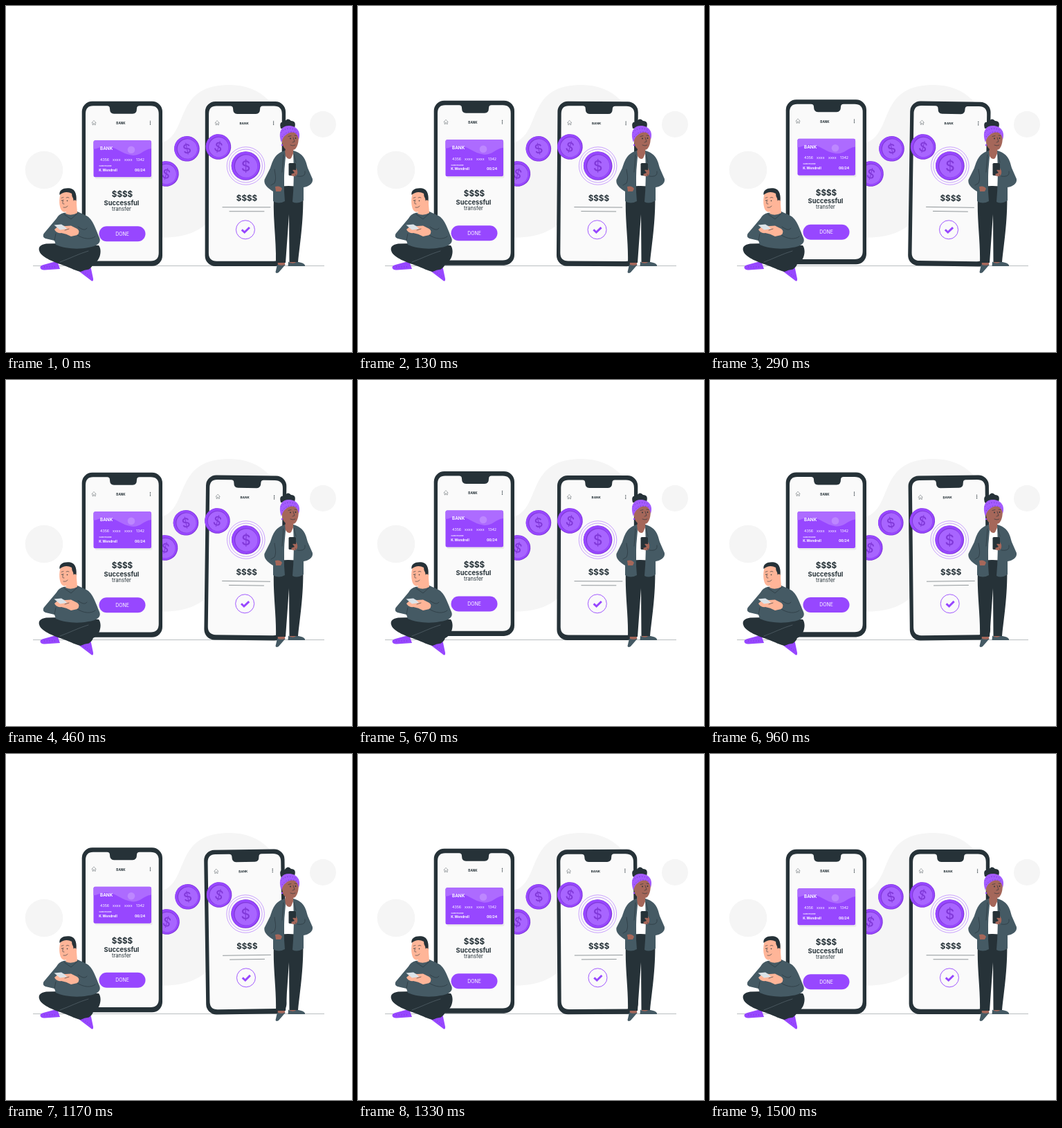
Recreate the animation shown at these times as an HTML page. Size 500 by 500 pixels, loop 1.54 s.

```html
<!DOCTYPE html>
<html lang="en">
<head>
<meta charset="utf-8">
<title>Bank transfer</title>
<style>
  html, body { margin: 0; width: 100%; height: 100%; overflow: hidden; background: #fff; }
  svg { display: block; width: 100%; height: 100%; }
  text { font-family: Inter, "Open Sans", sans-serif; font-weight: 700; }
  .mid { text-anchor: middle; }
  .dark { fill: #263238; }
  .slate { fill: #455a64; }
  .purple { fill: #9747ff; }
  .skin { fill: #ffb598; }
  .brown { fill: #a5675a; }
  .pale { fill: #f5f5f5; }
  .line { fill: none; stroke: #263238; stroke-width: .6; stroke-linecap: round; stroke-linejoin: round; }
  .ring { fill: none; stroke: #9747ff; stroke-width: .5; }
  .regular text, text.regular { font-weight: 400; }
</style>
</head>
<body>
<svg viewBox="0 0 500 500">
  <defs>
    <g id="phone">
      <rect class="dark" x="109.700" y="138" width="116.300" height="238" rx="15"/>
      <path fill="#fafafa" d="M126 144.500H146Q150 144.500 150 148.500Q150 156 156 156H183Q189 156 189 148.500Q189 144.500 193 144.500H209Q220.700 144.500 220.700 156V357Q220.700 368.700 209 368.700H126.500Q115 368.700 115 357V156Q115 144.500 126 144.500Z"/>
      <path class="line" d="M124 169L127 165.500L130 169M125 168.500V172H126.200V170H128V172H129.300V168.500" style="stroke-width:.35"/>
      <text class="dark mid" x="166" y="171.300" font-size="4.600">BANK</text>
      <g class="dark"><circle cx="208.500" cy="166.800" r=".7"/><circle cx="208.500" cy="169" r=".7"/><circle cx="208.500" cy="171.200" r=".7"/></g>
    </g>
    <g id="coin">
      <circle r="18.300" fill="#8139d9"/>
      <circle class="purple" cx="-.5" cy="-.3" r="17.700"/>
      <circle r="14.800" fill="#8139d9"/>
      <circle cx=".5" cy=".4" r="14.200" fill="#a865ff"/>
      <text class="mid" y="6.700" font-size="18.500" fill="#8139d9" style="font-weight:500">$</text>
    </g>
    <clipPath id="cardShape"><rect x="126.500" y="194.500" width="83.500" height="53" rx="2.500"/></clipPath>
  </defs>

  <path class="pale" d="M215 200C270 195 235 114 323 114C372 114 397 148 401 185V300H300C286 328 252 337 215 334Z"/>
  <circle class="pale" cx="55" cy="237" r="27.300"/>
  <circle class="pale" cx="458" cy="171" r="19"/>
  <path d="M39 375.500H460" stroke="#8d9498" stroke-width=".6"/>

  <g class="shake"><use href="#coin" transform="translate(231.500 242.500) rotate(15)"/></g>

  <g id="sender">
    <use href="#phone"/>
    <rect x="128.500" y="197" width="83" height="53" rx="2.500" fill="#ebebeb"/>
    <g clip-path="url(#cardShape)">
      <rect class="purple" x="126" y="194" width="85" height="54"/>
      <path fill="#ad6bff" d="M126 194H211V206C198 207 195 217 182 216C167 214 158 203 145 203C136 203 132 207 126 207Z"/>
      <circle cx="181" cy="208" r="5.300" fill="#bd87ff"/>
    </g>
    <g fill="#fff">
      <text x="136" y="208.400" font-size="6.300">BANK</text>
      <g class="regular" font-size="5.300">
        <text x="136" y="224">4356</text>
        <text x="154" y="224">xxxx</text>
        <text x="171" y="224">xxxx</text>
        <text x="188" y="224">1342</text>
      </g>
      <text x="134.500" y="232" font-size="2.500">CARD HOLDER</text>
      <text x="134.300" y="238.700" font-size="4.900">K.Wendrell</text>
      <text x="186" y="238.700" font-size="5">06/24</text>
    </g>
    <g class="dark mid">
      <text x="168" y="276.500" font-size="11.600">$$$$</text>
      <text x="167" y="288.200" font-size="9.300">Successful</text>
      <text class="regular" x="167" y="296.200" font-size="7.600">transfer</text>
    </g>
    <rect class="purple" x="134.500" y="318.500" width="67" height="22" rx="11"/>
    <text class="mid regular" x="168" y="331.900" font-size="6.900" fill="#fff">DONE</text>
  </g>

  <g id="receiver">
    <use href="#phone" x="178"/>
    <circle class="ring" cx="346.500" cy="231" r="27.300"/>
    <circle class="ring" cx="346.500" cy="231" r="24"/>
    <use href="#coin" transform="translate(346.500 231) scale(1.140)"/>
    <text class="dark mid" x="348" y="281.600" font-size="11.600">$$$$</text>
    <path class="line" d="M313 290.800H382M323 296.800H373" style="stroke-width:.5"/>
    <circle class="ring" cx="346" cy="323.300" r="13.500" style="stroke-width:.9"/>
    <path d="M340.800 323.300L344.800 327L352 320" fill="none" stroke="#9747ff" stroke-width="3"/>
  </g>

  <g class="shake">
    <use href="#coin" transform="translate(261.500 206.300) rotate(-12)"/>
    <use href="#coin" transform="translate(307 203.500) rotate(15)"/>
  </g>

  <g id="man">
    <path class="purple" d="M74 368.500L54 374Q49 375 49.500 378.500Q51 382 56 381.500L78 380ZM105 383L124 397.500Q126.500 398 126 394L122 375Z"/>
    <path class="dark" d="M80 343L58 343.500C49 345 46 349 48.500 355C52 364 72 371 84 375C94 379 102 383 108 384Q113 381 120 380.500Q124 378 126 373C137 368 139 352 134 346Z"/>
    <path class="line" d="M78 370C92 365 105 358 119 354" style="stroke:#607078"/>
    <path class="slate" d="M83 299Q76 301 73 307L54.500 329Q52 334 57 336L70 339L72 345C85 351 105 352 119 349C132 347 138 342 135 335C129 321 125 306 114 302L103 297Z"/>
    <path class="skin" d="M79 270C76 280 77 290 80 295Q83 299 87 297L86 300Q94 304 103 299L101 273Q92 264 79 270Z"/>
    <path class="dark" d="M77.500 273C76 265 85 262 93 263.500C101 265 103 275 101 285L98.500 286L97 278Q95 275 95 271Q86 266 77.500 273Z"/>
    <ellipse class="skin" cx="99.500" cy="284" rx="2.600" ry="3.500"/>
    <path class="line" d="M80 277.500L83 276.500M87 277Q89 275.500 91 277M83 280Q81 285 82.500 286L84 286M83 291Q87 292 89 289"/>
    <circle class="dark" cx="81" cy="281" r=".8"/><circle class="dark" cx="88.500" cy="281.500" r=".8"/>
    <path class="skin" d="M70 323Q75 317 86 318L94 317.500L103 322Q108 326 103 331L94 333Q87 329 80 328Q73 329 70 323Z"/>
    <path fill="#dce3e8" d="M69.500 316.500L80 315.500Q86 319 88 322L78 323.500Z"/>
    <path class="line" d="M104 319C110 323 114 325 117 321M103 331C112 337 123 338 129 333M85 324L91 322M72 329L70 339M84 301L94 308L104 299"/>
    <path d="M55 377H73M111 384L122 391" stroke="#6b2fbf" stroke-dasharray=".8 3"/>
  </g>

  <g id="woman">
    <path class="brown" d="M392 364H403V375H393ZM410 364H419V372H410Z"/>
    <path class="slate" d="M392 373.500Q398 376 404 373.500L394 385Q390 387 389.500 384.500ZM408 369.500Q415 374 420 369.500Q431 371 432 374.500V376H407.500Z"/>
    <path fill="#fff" d="M401 211L416 210L418 264H402Z"/>
    <path class="dark" d="M388 262Q408 258 429 262C431 306 425 340 422 370H409.500L409 301L404 371H390C391 335 384 300 388 262Z"/>
    <path class="brown" d="M399 181Q397 202 404 207L402 213Q407 224 412 220L416 211L415 208Q424 206 423 181Z"/>
    <path class="slate" d="M403 209C389 213 386 222 382 234L373.500 251C372 259 380 264 386 268L386 282Q394 287 403 282Q400 252 404 218ZM415 209C430 213 433 222 436 234L443 250C444 257 437 261 430 262L430 281Q421 287 414 283Q417 252 415 209Z"/>
    <path class="brown" d="M389 261Q396 259 399 264L397 268L390 268ZM409 239Q411 233 418 232L421 238Q422 244 418 246L411 245Z"/>
    <rect class="dark" x="408.500" y="227" width="10.500" height="18" rx="1.600"/>
    <path class="brown" d="M414 237Q420 236 421 240L417 246Q413 246 412 243L417 241Z"/>
    <path class="line" d="M388 236C389 244 391 249 388 256L383 259M432 239C433 245 429 247 421 246M401 215L399 240M416 214L419 226"/>
    <path class="dark" d="M397 177Q394 166 402 168Q407 160 412 166Q420 166 417 176Z"/>
    <path fill="#a45cff" d="M398 197C393 184 397 172.500 409 173C420 173 427 182 423 193Q422 186 417 183Q410 181 405 186Q400 189 398 197Z"/>
    <path d="M397 183Q406 173 420 180M399 189Q407 178 421 184" fill="none" stroke="#6f34c4" stroke-dasharray="1.200 2.500"/>
    <path class="line" d="M408 188.500L412 187.500M417 187L420 187.500M415 190L417 196L414 197M411 201Q415 203 418 201"/>
    <circle class="dark" cx="411" cy="191.500" r=".9"/><circle class="dark" cx="418.500" cy="191" r=".9"/>
    <circle class="purple" cx="399" cy="201" r="1.200"/>
  </g>
</svg>
<script>
  const LOOP = 1540, CYCLE = 1500, LEAD = 20;
  const sender = document.getElementById('sender');
  const receiver = document.getElementById('receiver');
  const coins = document.querySelectorAll('.shake');
  const floatSteps = [0, -6.5, 0];
  const tiltSteps = [0, 1, 0, -1, 0];
  const shakeSteps = [0, -1, 2, -4, 4, -4, 4, -4, 2, -1, 0];

  // Linear interpolation through evenly spaced values.
  function along(values, u) {
    const p = u * (values.length - 1), i = Math.floor(p);
    return values[i] + (values[i + 1] - values[i]) * (p - i);
  }

  function draw(now) {
    const u = ((now % LOOP + LEAD) % CYCLE) / CYCLE;
    sender.setAttribute('transform', `translate(0 ${along(floatSteps, u)})`);
    receiver.setAttribute('transform', `rotate(${along(tiltSteps, u)} 345.5 257)`);
    for (const c of coins) c.setAttribute('transform', `translate(${along(shakeSteps, u) * .65} 0)`);
    requestAnimationFrame(() => draw(performance.now() - start));
  }
  const start = performance.now();
  draw(0);
</script>
</body>
</html>
```
